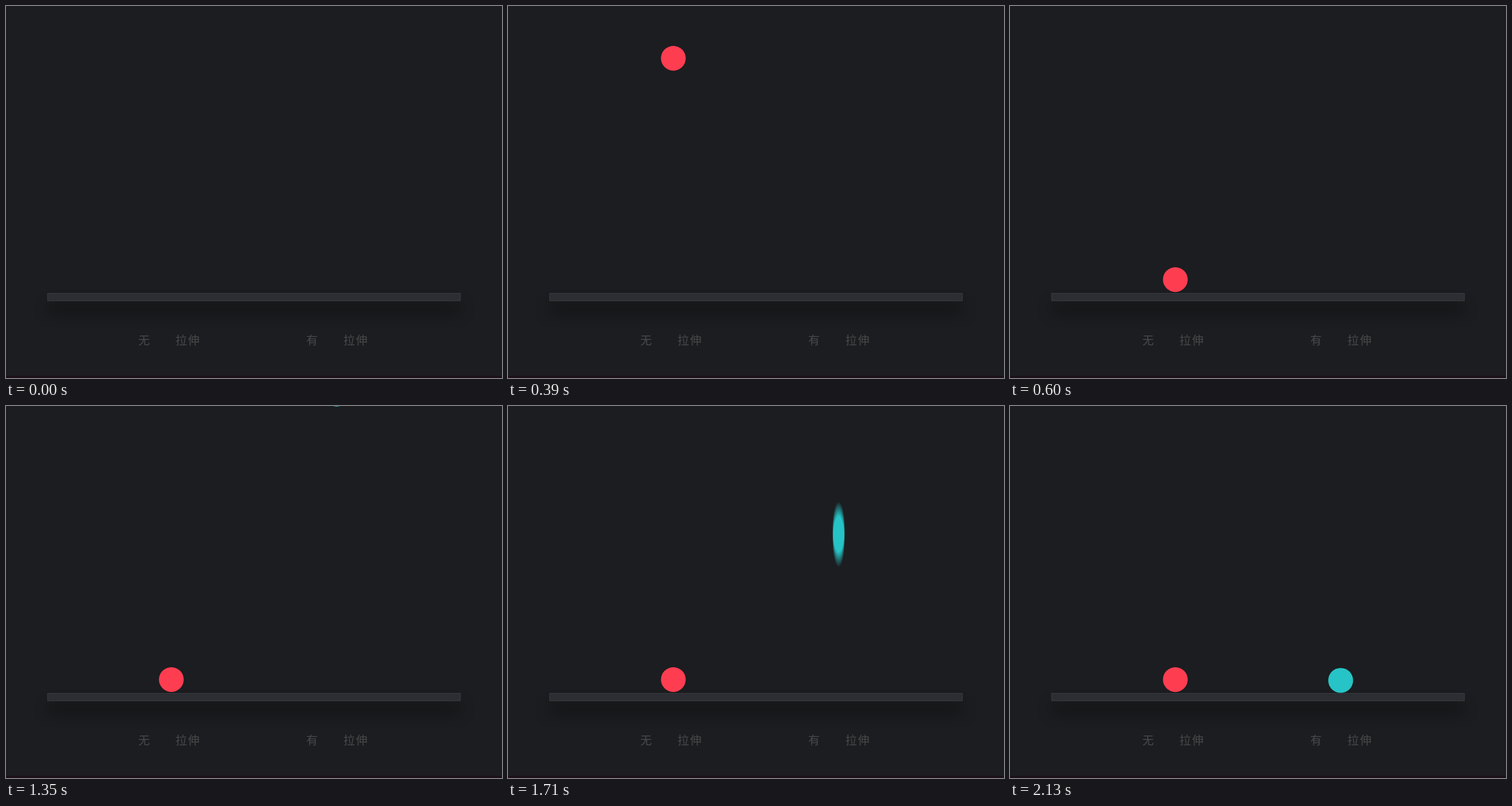
An HTML page with a canvas for the animation above (2220 ms loop, 864x648 px).

```html
<!DOCTYPE html>
<html lang="zh">
<head>
<meta charset="utf-8">
<style>
html, body { margin: 0; width: 100%; height: 100%; overflow: hidden; background: #1c1d20; }
div, p, canvas { position: absolute; margin: 0; }
canvas { left: 0; top: 0; }
.floor {
  left: 72px; top: 500px; width: 720px; height: 14px; box-sizing: border-box;
  background: #2c2e34; border: 1px solid #3b3c3f;
  box-shadow: 0 21px 24px rgba(0, 0, 0, .4);
}
.edge { left: 0; top: 644px; width: 864px; height: 4px; background: #1c1119; }
p {
  top: 572px; white-space: pre; color: #48494b; letter-spacing: 1.6px;
  font: 300 20px/20px "Noto Sans CJK SC", "Noto Sans CJK", sans-serif;
}
</style>
</head>
<body>
<div class="floor"></div>
<div class="edge"></div>
<p style="left:230.5px">无&#x3000;&#x3000;拉伸</p>
<p style="left:523px">有&#x3000;&#x3000;拉伸</p>
<canvas id="stage" width="864" height="648"></canvas>
<script>
const LOOP = 2220, STEP = 30, R = 21.6;
const SHUTTER = 15, SAMPLES = 51;
const LAND = 1810;
const canvas = document.getElementById('stage');
const ctx = canvas.getContext('2d');
const layer = document.createElement('canvas');
layer.width = canvas.width;
layer.height = canvas.height;
const blur = layer.getContext('2d');

const clamp = v => Math.min(1, Math.max(0, v));
const mix = (a, b, k) => a + (b - a) * k;
const smooth = k => k * k * (3 - 2 * k);

// Accelerating fall: cubic-bezier(.76, 0, 1, 1)
function fall(x) {
  if (x <= 0) return 0;
  if (x >= 1) return 1;
  let lo = 0, hi = 1;
  for (let i = 0; i < 30; i++) {
    const s = (lo + hi) / 2;
    if (smooth(s) + 2.28 * s * (1 - s) ** 2 < x) lo = s; else hi = s;
  }
  return smooth(lo);
}

// Time, horizontal scale, vertical scale after touching the floor
const bounce = [
  [LAND, .38, 2.23], [1862, 1.8, .46], [1965, .8, 1.31], [2060, 1.1, .92], [2128, 1, 1]
];

function stretch(t) {
  if (t <= LAND) {
    const k = clamp((t - 1333) / (LAND - 1333)) ** .76;
    return [mix(1, .38, k), mix(1, 2.23, k)];
  }
  const i = bounce.findIndex(b => b[0] >= t);
  if (i < 0) return [1, 1];
  const [t0, x0, y0] = bounce[i - 1], [t1, x1, y1] = bounce[i];
  let k = (t - t0) / (t1 - t0);
  if (i > 1) k = smooth(k);
  return [mix(x0, x1, k), mix(y0, y1, k)];
}

// Ball standing on the given bottom line
function ball(c, x, bottom, sx, sy) {
  c.beginPath();
  c.ellipse(x, bottom - R * sy, R * sx, R * sy, 0, 0, 2 * Math.PI);
  c.fill();
}

function drawBlurred(t) {
  blur.globalCompositeOperation = 'source-over';
  blur.globalAlpha = 1;
  blur.clearRect(0, 0, 864, 648);
  blur.globalCompositeOperation = 'lighter';
  blur.globalAlpha = 1 / SAMPLES;
  blur.fillStyle = '#fff';
  for (let i = 0; i < SAMPLES; i++) {
    const at = t + SHUTTER * i / (SAMPLES - 1);
    ball(blur, 576, 499.6 * fall((at - 1333) / (LAND - 1333)), ...stretch(at));
  }
  blur.globalCompositeOperation = 'source-in';
  blur.globalAlpha = 1;
  blur.fillStyle = '#26c4c6';
  blur.fillRect(0, 0, 864, 648);
  ctx.drawImage(layer, 0, 0);
}

function draw(now) {
  const t = Math.floor(now % LOOP / STEP) * STEP;
  ctx.clearRect(0, 0, 864, 648);
  ctx.fillStyle = '#ff3d51';
  if (t >= 150) ball(ctx, 288, 498.2 * fall((t - 120) / 480), 1, 1);
  if (t >= 1350) drawBlurred(t);
}

let start;
function frame(now) {
  start ??= now;
  draw(now - start);
  requestAnimationFrame(frame);
}
requestAnimationFrame(frame);
</script>
</body>
</html>
```
